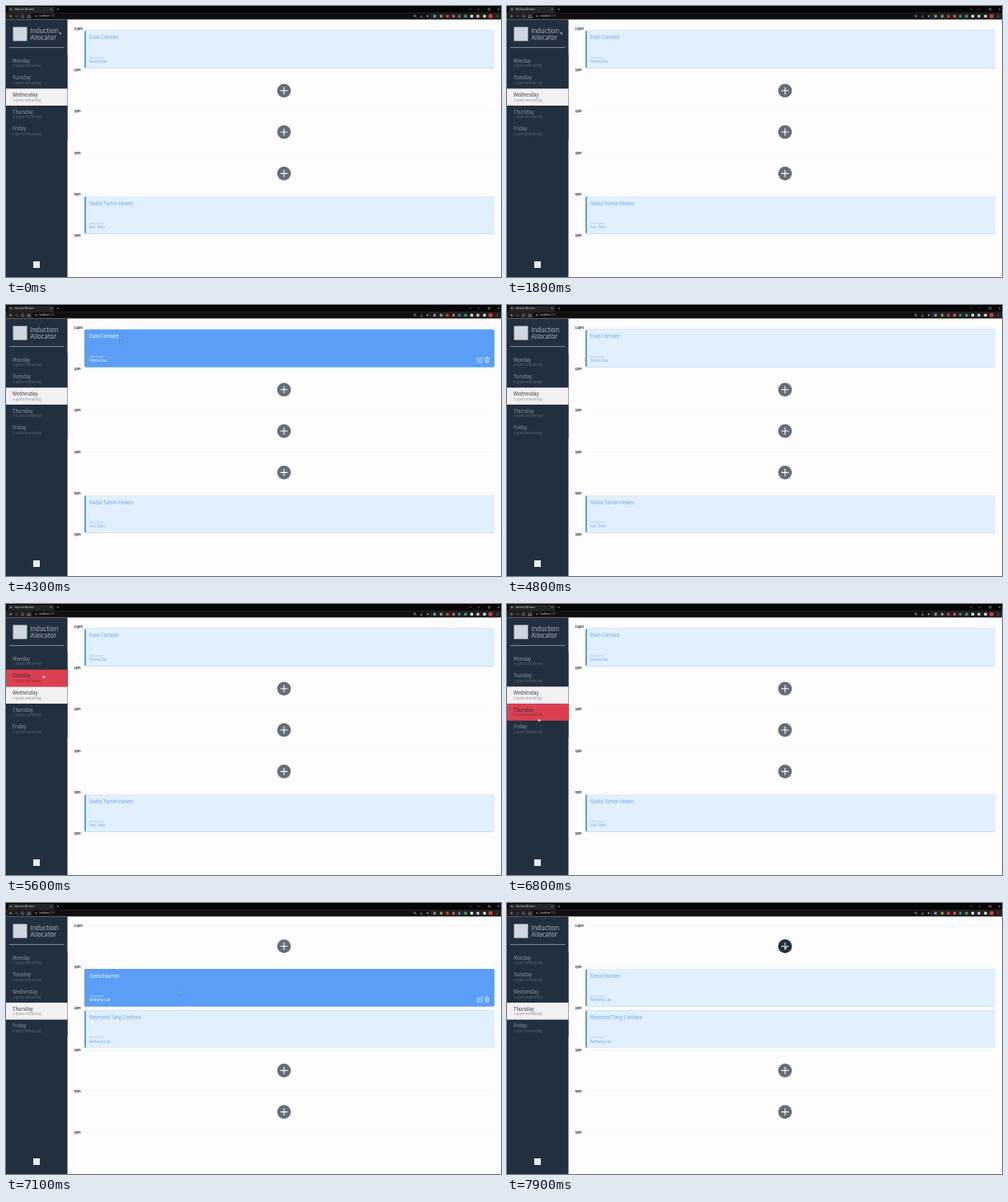
These frames come from a looping animation (600 by 329 pixels, 8 s). An HTML page:

```html
<!DOCTYPE html>
<html lang="en">
<head>
<meta charset="utf-8">
<title>Induction Allocator</title>
<style>
html, body { margin: 0; width: 100%; height: 100%; overflow: hidden; background: #fff; }
svg { display: block; width: 100vw; height: 100vh; }
text { font-family: "Noto Sans CJK JP", "Noto Sans CJK SC", "Noto Sans CJK", "Open Sans", sans-serif; }
.chrome text { font-family: "Open Sans", sans-serif; font-size: 2.75px; }
.title { font-size: 7.5px; font-weight: 300; fill: #adb6bf; }
.day { font-size: 5.65px; }
.spots { font-size: 4.2px; }
.hour { font-size: 3.75px; font-weight: 700; fill: #222f3e; }
.student { font-size: 5.6px; }
.label { font-size: 3.3px; }
.host { font-size: 4.4px; }

.anim { animation: 8s step-end infinite; }
.first { animation-name: first; }
.second { animation-name: second; }
.hoverTop { animation-name: hoverTop; }
.hoverMon { animation-name: hoverMon; }
.hoverTue { animation-name: hoverTue; }
.hoverThu { animation-name: hoverThu; }
.hoverCard { animation-name: hoverCard; }
.hoverPlus { animation-name: hoverPlus; }
.arrow { animation-name: arrow; }
.hand { animation-name: hand; }
@keyframes first { 0% { opacity: 1 } 86.25% { opacity: 0 } }
@keyframes second { 0% { opacity: 0 } 86.25% { opacity: 1 } }
@keyframes hoverTop { 0%, 60% { opacity: 0 } 51.25% { opacity: 1 } }
@keyframes hoverMon { 0%, 67.5% { opacity: 0 } 63.75% { opacity: 1 } }
@keyframes hoverTue { 0%, 75% { opacity: 0 } 67.5% { opacity: 1 } }
@keyframes hoverThu { 0%, 86.25% { opacity: 0 } 80% { opacity: 1 } }
@keyframes hoverCard { 0%, 92.5% { opacity: 0 } 87.5% { opacity: 1 } }
@keyframes hoverPlus { 0% { opacity: 0 } 96.25% { opacity: 1 } }
@keyframes arrow { 0%, 87.5% { opacity: 1 } 63.75%, 96.25% { opacity: 0 } }
@keyframes hand { 0%, 87.5% { opacity: 0 } 63.75%, 96.25% { opacity: 1 } }

/* The pointer is sampled ten times a second. */
.pointer { animation: pointer 8s infinite; }
@keyframes pointer {
  0% { transform: translate(65px, 31px); animation-timing-function: step-end }
  33.75% { transform: translate(65px, 31px); animation-timing-function: steps(6) }
  41.25% { transform: translate(208px, 5px); animation-timing-function: steps(3) }
  45% { transform: translate(204px, 2px); animation-timing-function: steps(3) }
  48.75% { transform: translate(170px, 24.5px); animation-timing-function: steps(5) }
  55% { transform: translate(130px, 48px); animation-timing-function: steps(4) }
  60% { transform: translate(94.5px, 64.5px); animation-timing-function: steps(4) }
  65% { transform: translate(60px, 74px); animation-timing-function: steps(4) }
  70% { transform: translate(45px, 86px); animation-timing-function: steps(6) }
  77.5% { transform: translate(40px, 110px); animation-timing-function: steps(3) }
  81.25% { transform: translate(39px, 128px); animation-timing-function: steps(3) }
  85% { transform: translate(38.5px, 138.5px); animation-timing-function: steps(1) }
  86.25% { transform: translate(42px, 139px); animation-timing-function: steps(2) }
  88.75% { transform: translate(209.5px, 108px); animation-timing-function: steps(3) }
  92.5% { transform: translate(300px, 73px); animation-timing-function: steps(3) }
  96.25%, 100% { transform: translate(337px, 51.5px); animation-timing-function: step-end }
}
</style>
</head>
<body>
<svg id="stage" viewBox="0 0 600 329" preserveAspectRatio="none"></svg>
<script>
const days = ["Monday", "Tuesday", "Wednesday", "Thursday", "Friday"];
const hours = ["12pm", "1pm", "2pm", "3pm", "4pm", "5pm"];
const slotY = i => 27.4 + i * 50.28;

const rect = (x, y, w, h, fill, rx = 0) =>
  `<rect x="${x}" y="${y}" width="${w}" height="${h}" rx="${rx}" fill="${fill}"/>`;
const dot = (x, y, r, fill) => `<circle cx="${x}" cy="${y}" r="${r}" fill="${fill}"/>`;
const text = (x, y, s, cls, fill = "") =>
  `<text x="${x}" y="${y}" class="${cls}"${fill && ` fill="${fill}"`}>${s}</text>`;
const line = (d, stroke, w) =>
  `<path d="${d}" fill="none" stroke="${stroke}" stroke-width="${w}"/>`;
const anim = (name, body) => `<g class="anim ${name}">${body}</g>`;

const rowLooks = {
  plain: ["#222f3e", "#929ba5", "#5f6a76"],
  selected: ["#f2f0f2", "#2c3745", "#8d9096"],
  hover: ["#db4050", "#2b2d3c", "#8a2f3f"]
};

function row(i, look) {
  const [back, name, spots] = rowLooks[look];
  const y = 59 + i * 20.65;
  return rect(0, y, 74.5, 20.65, back) +
    text(8, y + 9.7, days[i], "day", name) +
    text(8, y + 15.3, "3 spots remaining", "spots", spots);
}

function card(i, student, host, hover) {
  const y = slotY(i);
  const [name, label, who] = hover
    ? ["#fff", "#cfe2fd", "#fff"] : ["#64a2f2", "#9cc2f0", "#6fa6e8"];
  const back = hover
    ? rect(95, y + 2.4, 497, 45.6, "#5a9ef8", 2)
    : rect(95, y + 2.4, 497, 45.6, "#609fdc", 2) +
      `<path d="M97 ${y + 2.4}h493q2 0 2 2v41.6q0 2-2 2h-493z" fill="#e2effc"/>`;
  const tools = line(`M575 ${y + 37.2}h-3.6v5.4h5.4v-3M573.4 ${y + 40.6}l.3-1.5 3.2-3.2 1.2 1.2-3.2 3.2z` +
    `M580.2 ${y + 37.2}h5.6M582 ${y + 37}v-.9h2v.9M580.9 ${y + 37.4}l.3 5.2h3.6l.3-5.2M582.2 ${y + 38.6}v2.8M583.8 ${y + 38.6}v2.8`,
    "#fff", .55);
  return back + text(101, y + 13, student, "student", name) +
    text(101, y + 36.1, "Interviewer", "label", label) +
    text(101, y + 41.7, host, "host", who) + (hover ? tools : "");
}

function plus(i, fill = "#646d78") {
  const y = slotY(i) + 25.1;
  return dot(337, y, 8.3, fill) + line(`M332.6 ${y}h8.8M337 ${y - 4.4}v8.8`, "#fff", 1.1);
}

function chrome() {
  const icons = [
    [519.5, "#7d8da0"], [527.5, "#7ea04a"], [535, "#d43c3c"], [542.5, "#d9545a"],
    [549.5, "#2f8290"], [557, "#39a853"], [564.5, "#eee"], [572, "#ccc"], [580, "#e8e8e8"]
  ];
  return `<g class="chrome">` +
    rect(0, 0, 600, 8.2, "#050505") + rect(2, 1, 56.5, 7.2, "#242426", 1.2) +
    rect(0, 8, 600, 8.4, "#202022") + rect(31, 9, 482, 6.4, "#101012", 3.2) +
    dot(6, 4, 1.1, "#9aa4ae") + text(10, 5, "Induction Allocator", "", "#ddd") +
    line("M53.6 3l2 2m0-2l-2 2M61.5 4.1h2.6m-1.3-1.3v2.6", "#ccc", .45) +
    line("M561.5 4h2.4M571.5 4h2.4M584.5 2.9h2.2v2.2h-2.2zM596 2.9l2.2 2.2m0-2.2l-2.2 2.2", "#ccc", .45) +
    line("M5.9 11l-1.4 1.3 1.4 1.3M4.5 12.3h2.8M21.4 11.4a1.5 1.5 0 1 0 .3 1.4M26 12.3l1.8-1.5 1.8 1.5v1.6h-3.6z", "#ddd", .5) +
    line("M11.3 12.3h2.8M12.7 11l1.4 1.3-1.4 1.3", "#777", .5) +
    dot(36.5, 12.3, 1, "#888") +
    text(40.5, 13.3, `localhost<tspan fill="#777">:3000</tspan>`, "", "#eee") +
    line("M496.2 12.8l1.4 1.4M502 13.7h2.6v-1M502.6 12.3l2-1.2", "#ccc", .5) +
    `<circle cx="495.4" cy="11.9" r="1.1" fill="none" stroke="#ccc" stroke-width=".5"/>` +
    dot(511, 12.3, 1.1, "#aaa") +
    icons.map(([x, c]) => rect(x - 1.6, 10.7, 3.2, 3.2, c, .4)).join("") +
    dot(587.3, 12.3, 2.5, "#d23c36") +
    [11, 12.3, 13.6].map(y => dot(595.5, y, .4, "#ddd")).join("") + `</g>`;
}

function sidebar() {
  return rect(0, 16.4, 74.5, 313, "#222f3e") +
    rect(8.5, 25.5, 17, 17, "#cfd6dd") +
    text(29.5, 33.4, "Induction", "title") + text(29.5, 40.9, "Allocator", "title") +
    rect(4, 49.9, 66.5, .8, "#9ca5ae") +
    days.map((d, i) => row(i, "plain")).join("") +
    anim("first", row(2, "selected")) + anim("second", row(3, "selected")) +
    anim("hoverMon", row(0, "hover")) + anim("hoverTue", row(1, "hover")) +
    anim("hoverThu", row(3, "hover")) +
    rect(33, 310, 8, 8, "#e8ebee");
}

function schedule() {
  const evan = [0, "Evan Corralez", "Sirena Das"];
  const elena = [1, "Elena Fournel", "Bethany Lau"];
  return hours.map((h, i) => text(82.4, slotY(i) + 1.4, h, "hour") +
      rect(95, slotY(i) - .2, 497, .4, "#ececee")).join("") +
    anim("first", card(...evan) + [1, 2, 3].map(i => plus(i)).join("") +
      card(4, "Nadia Turner-Howes", "Ivor Tann")) +
    anim("hoverTop", card(...evan, true)) +
    anim("second", plus(0) + card(...elena) +
      card(2, "Raymond Tang-Cordova", "Bethany Lau") + plus(3) + plus(4)) +
    anim("hoverCard", card(...elena, true)) +
    anim("hoverPlus", plus(0, "#222f3e"));
}

const pointer = `<g class="pointer" stroke="#222" stroke-width=".35" fill="#fff">` +
  anim("arrow", `<path d="M0 0v3.4l.8-.7.6 1.3.6-.3-.6-1.2h1.1z"/>`) +
  anim("hand", `<path d="M-.4 0q.5-.5.9 0v1.4l1.5.5q.4.2.2 1l-.4 1.2h-2l-1.3-1.8q.3-.6 1.1 0z"/>`) + `</g>`;

document.getElementById("stage").innerHTML =
  rect(0, 0, 600, 329, "#fefdfe") + schedule() + sidebar() + chrome() + pointer;
</script>
</body>
</html>
```
